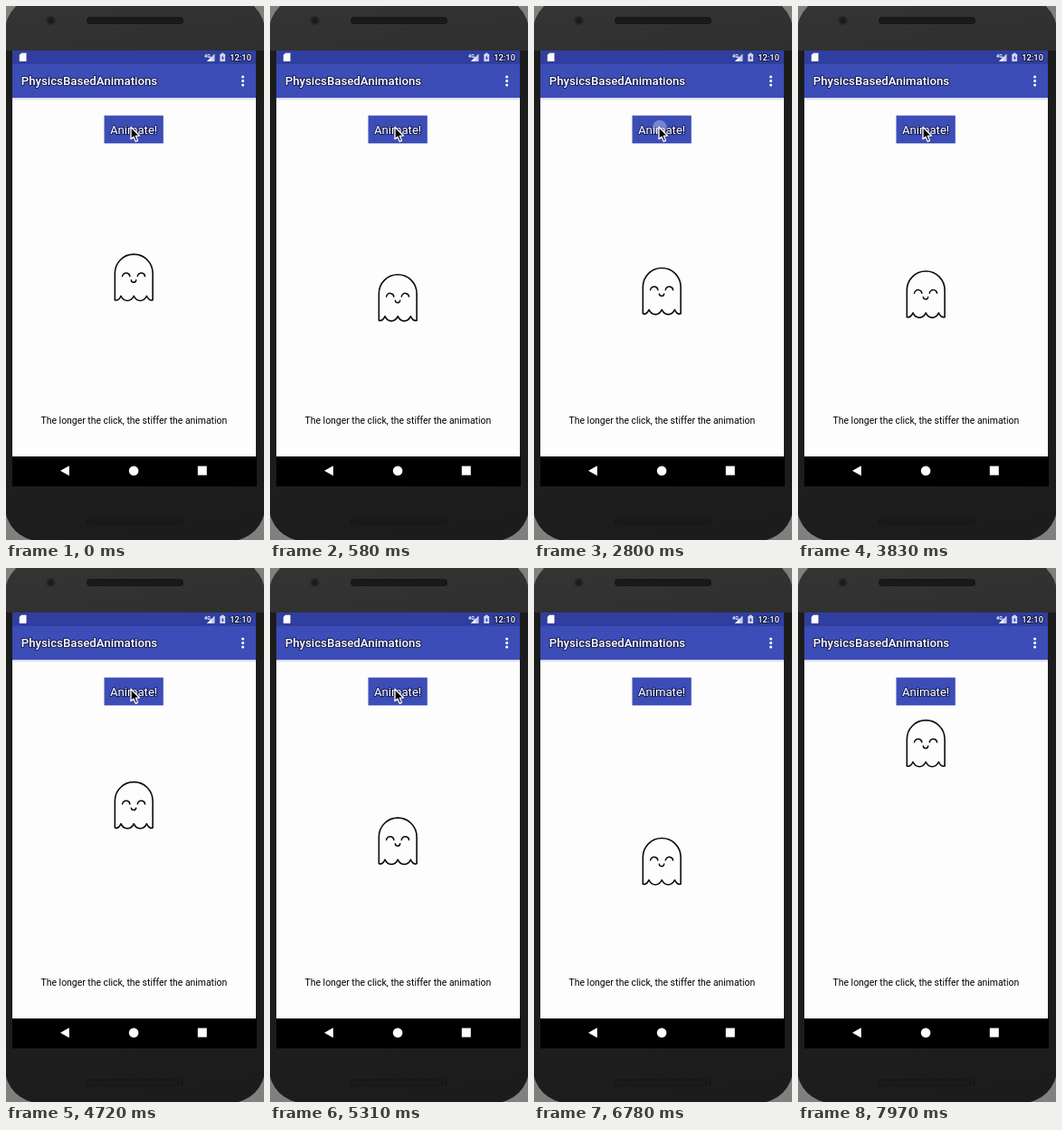
An HTML page with a canvas that plays this animation: 285 by 588 pixels, repeating every 8540 ms.

```html
<!DOCTYPE html>
<html lang="en">
<head>
<meta charset="utf-8">
<title>Spring animation</title>
<style>
  html, body { margin: 0; width: 100%; height: 100%; overflow: hidden; background: #2b2b2b; }
  canvas { display: block; width: 285px; height: 588px; }
</style>
</head>
<body>
<canvas id="stage"></canvas>
<script>
const W = 285, H = 588, LOOP = 8540;
const canvas = document.getElementById('stage');
const ctx = canvas.getContext('2d');
const dpr = window.devicePixelRatio || 1;
canvas.width = W * dpr;
canvas.height = H * dpr;

const RUNS = [[140, 1160], [2800, 3830], [4430, 5460], [5600, 6630], [6780, 7820]];
const HOME = 167, REST = 291.9, ZETA = 0.2;
// Springs: visible from, until, release time (ms), damped frequency (rad/s)
const SPRINGS = [
  { from: 0, to: 1310, start: -68, freq: 23 },
  { from: 2800, to: 3980, start: 2721.5, freq: 22 },
  { from: 4580, to: 7970, start: 4554, freq: 7.05 }
];
const TOUCHES = [[1900, 2950], [4430, 4580]];
const BLUE = '#3d4db7', HALO = 'rgba(10,14,50,.7)';

function held(t) {
  for (const [a, b] of RUNS) {
    if (t < a || t >= b + 145) continue;
    for (let i = 7; i >= 0; i--) {
      const step = Math.round((a + i * (b - a) / 7) / 10) * 10;
      if (step <= t) return step;
    }
  }
  return t;
}

function ghostTop(t) {
  const s = SPRINGS.find(s => t >= s.from && t < s.to);
  if (!s) return HOME;
  const phase = (t - s.start) / 1000 * s.freq;
  const k = ZETA / Math.sqrt(1 - ZETA * ZETA);
  return REST + (HOME - REST) * Math.exp(-k * phase) * (Math.cos(phase) + k * Math.sin(phase));
}

function cursorPos(t) {
  if (t < 6780) {
    const p = Math.min(1, Math.max(0, (t - 6040) / 590));
    const e = p * p * (3 - 2 * p);
    return [138 + 127 * e, 133.2 + 299 * e];
  }
  if (t >= 6920 && t < 7070) return [277, 558];
  return null;
}

function rect(x, y, w, h, color) {
  ctx.fillStyle = color;
  ctx.fillRect(x, y, w, h);
}

function round(x, y, w, h, r, color) {
  ctx.beginPath();
  ctx.roundRect(x, y, w, h, r);
  ctx.fillStyle = color;
  ctx.fill();
}

function disc(x, y, r, color) {
  ctx.beginPath();
  ctx.arc(x, y, r, 0, Math.PI * 2);
  ctx.fillStyle = color;
  ctx.fill();
}

function poly(points, color) {
  ctx.beginPath();
  points.forEach(([x, y]) => ctx.lineTo(x, y));
  ctx.closePath();
  ctx.fillStyle = color;
  ctx.fill();
}

function fade(x0, y0, x1, y1, ...colors) {
  const g = ctx.createLinearGradient(x0, y0, x1, y1);
  colors.forEach((c, i) => g.addColorStop(i / (colors.length - 1), c));
  return g;
}

function text(str, x, y, font, color, align = 'left', halo) {
  ctx.font = font + ' Roboto, sans-serif';
  ctx.textAlign = align;
  if (halo) {
    ctx.strokeStyle = halo;
    ctx.lineWidth = 2;
    ctx.lineJoin = 'round';
    ctx.strokeText(str, x, y);
  }
  ctx.fillStyle = color;
  ctx.fillText(str, x, y);
}

function speaker(y) {
  round(89, y, 107, 8, 4, '#161616');
  ctx.fillStyle = '#2a2a2a';
  for (let row = 0; row < 3; row++)
    for (let x = 92 + row % 2; x < 193; x += 3) ctx.fillRect(x, y + 1.5 + row * 2, 1, 1);
}

function drawPhone() {
  rect(0, 0, W, H, '#808080');
  round(-1, -10, 287, 599, 38, fade(0, 0, 90, H, '#343434', '#242424', '#1c1c1c'));
  rect(0, 49, 7, 480, '#1c1c1c');
  rect(276, 49, 9, 480, '#1c1c1c');
  speaker(12);
  speaker(563);
  disc(49.5, 16, 5, '#262626');
  disc(49.5, 16, 3, '#1b1b1b');
}

function drawStatus() {
  rect(7, 49, 269, 16, '#303f9f');
  poly([[17, 51.8], [22.5, 51.8], [22.5, 61], [14.8, 61], [14.8, 54]], '#fff');
  text('4G', 219, 57, '700 5.5px', '#fff');
  poly([[230.5, 52.5], [230.5, 61], [222, 61]], '#c9cef0');
  poly([[227, 56], [227, 61], [222, 61]], '#fff');
  rect(237.8, 51.8, 2.8, 1.4, '#d5d9f2');
  rect(236.3, 53, 5.8, 8, '#d5d9f2');
  poly([[239.8, 54.3], [237.7, 57.6], [239.1, 57.6], [238.8, 60], [241, 56.7], [239.6, 56.7]], '#303f9f');
  text('12:10', 271, 60.3, '500 9.4px', '#fff', 'right', HALO);
}

function drawScreen() {
  rect(7, 65, 269, 431, '#fdfdfd');
  drawStatus();
  rect(7, 101, 269, 3, fade(0, 101, 0, 104, 'rgba(90,100,200,.3)', 'rgba(90,100,200,0)'));
  rect(7, 64, 269, 37, BLUE);
  text('PhysicsBasedAnimations', 16.7, 87.2, '500 13.22px', '#fff', 'left', HALO);
  for (const y of [78, 82.5, 87]) disc(261.6, y, 1.5, '#fff');

  rect(108.5, 120.6, 65.3, 30.7, BLUE);
  text('Animate!', 141.1, 140.8, '13.14px', '#fff', 'center', HALO);
  text('The longer the click, the stiffer the animation', 141.4, 460.4, '10.42px', '#000', 'center');

  rect(7, 496, 270, 33, '#000');
  poly([[60, 511.7], [69.8, 506.2], [69.8, 517.2]], '#fff');
  disc(141.1, 511.7, 5.3, '#fff');
  rect(211.8, 506.6, 10, 10, '#fff');
}

function drawGhost(top) {
  const r = 20.9;
  ctx.save();
  ctx.translate(141.2, top);
  ctx.strokeStyle = '#0c0c0c';
  ctx.lineWidth = 1.6;
  ctx.lineCap = ctx.lineJoin = 'round';
  ctx.beginPath();
  ctx.moveTo(-r, 51);
  ctx.arc(0, r + 0.6, r, Math.PI, 0);
  ctx.lineTo(r, 51);
  // scalloped hem
  ctx.quadraticCurveTo(17, 52.4, 14.2, 46.5);
  ctx.bezierCurveTo(11, 53.5, 3.2, 53.5, 0, 46.5);
  ctx.bezierCurveTo(-3.2, 53.5, -11, 53.5, -14.2, 46.5);
  ctx.quadraticCurveTo(-17, 52.4, -r, 51);
  ctx.closePath();
  ctx.stroke();

  ctx.lineWidth = 1.5;
  for (const x of [-8.5, 8.2]) {
    ctx.beginPath();
    ctx.arc(x, 25.4, 4.2, Math.PI * 1.04, Math.PI * 1.96);
    ctx.stroke();
  }
  ctx.beginPath();
  ctx.arc(-0.2, 28.8, 2.7, 0.1, Math.PI - 0.1);
  ctx.stroke();
  ctx.restore();
}

function drawCursor(x, y) {
  ctx.save();
  ctx.translate(x, y);
  ctx.beginPath();
  [[0, 0], [0, 13.4], [3, 10.8], [5.3, 16], [7.5, 15], [5.3, 9.9], [9.3, 9.6]]
    .forEach(([px, py]) => ctx.lineTo(px, py));
  ctx.closePath();
  ctx.fillStyle = '#000';
  ctx.fill();
  ctx.lineJoin = 'round';
  ctx.lineWidth = 1.3;
  ctx.strokeStyle = '#fff';
  ctx.stroke();
  ctx.restore();
}

function draw(now) {
  const t = held(now % LOOP);
  ctx.setTransform(dpr, 0, 0, dpr, 0, 0);
  drawPhone();
  drawScreen();
  drawGhost(ghostTop(t));
  if (TOUCHES.some(([a, b]) => t >= a && t < b)) disc(138.8, 133.6, 7.8, 'rgba(205,212,245,.42)');
  const pos = cursorPos(t);
  if (pos) drawCursor(...pos);
}

let origin;
function tick(now) {
  if (origin === undefined) origin = now;
  draw(Math.max(0, now - origin));
  requestAnimationFrame(tick);
}
draw(0);
requestAnimationFrame(tick);
</script>
</body>
</html>
```
